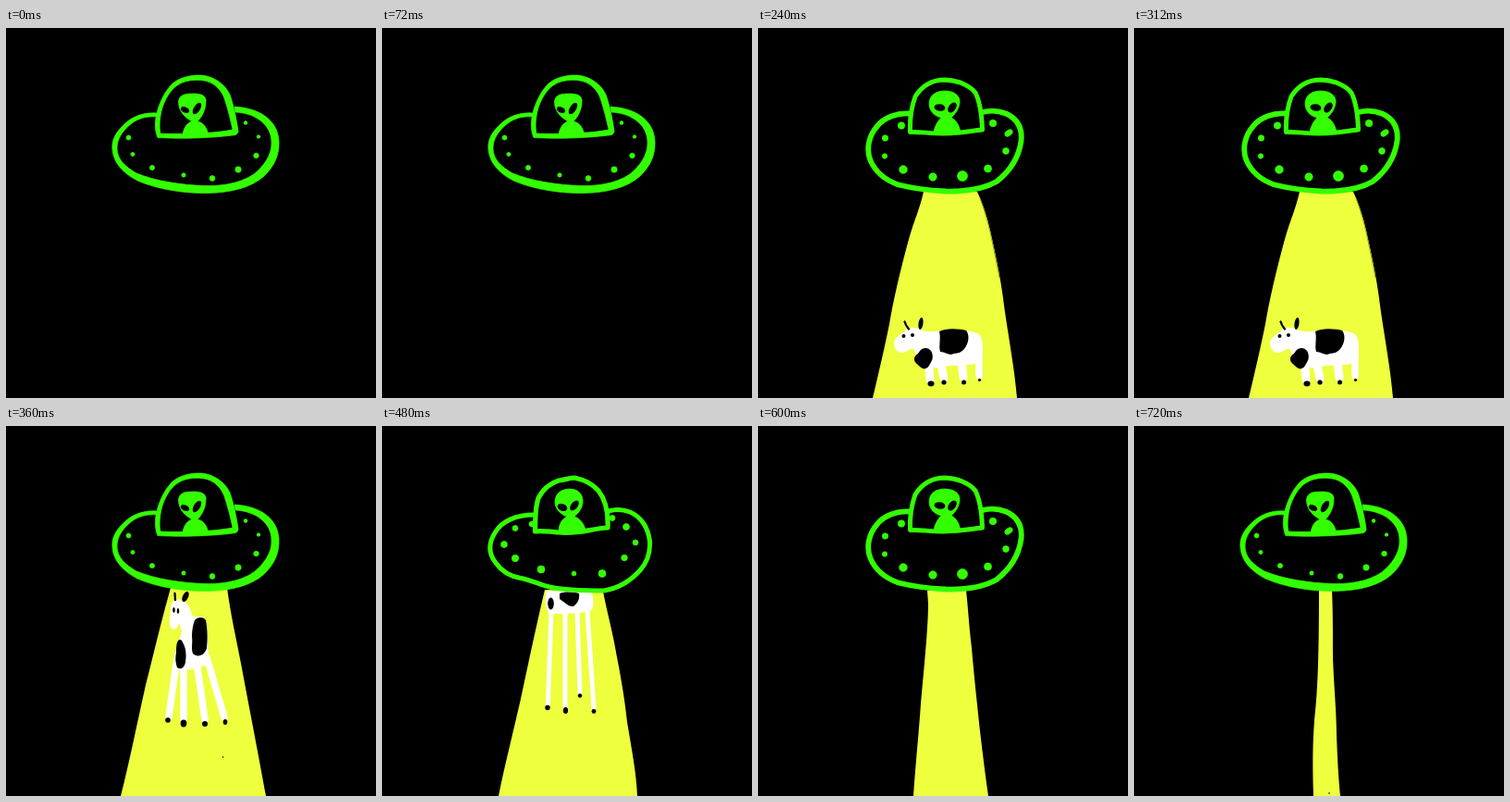
Animation, 400 px wide and 400 px high, one loop 840 ms. Source, as an HTML page:

```html
<!DOCTYPE html>
<html lang="en">
<head>
<meta charset="utf-8">
<title>Saucer and cow</title>
<style>
html, body { margin: 0; width: 100%; height: 100%; overflow: hidden; background: #000; }
/* Seven 400px drawings side by side, one shown at a time */
#strip { display: block; width: 2800px; height: 400px; animation: play 840ms steps(7) infinite; }
@keyframes play { to { transform: translateX(-2800px); } }
.line { fill: none; stroke: #3f0; stroke-linecap: round; stroke-linejoin: round; }
.green { fill: #3f0; stroke: #3f0; stroke-width: .7; }
.beam { fill: #edff3d; }
.edge { fill: none; stroke: #8f9a24; stroke-width: 1; }
.cow { fill: #fff; }
.legs { fill: none; stroke: #fff; stroke-linecap: round; }
.horn { fill: none; stroke: #000; stroke-width: 2.300; stroke-linecap: round; }
</style>
</head>
<body>
<svg id="strip" viewBox="0 0 2800 400">
<defs>
  <g id="saucerA">
    <g class="green" fill-rule="evenodd">
      <path d="M163 92C150 91 137 95 128 104C118 113 114 122 115 131C116 146 127 157 142 165C165 175 195 179 218 178.500C245 178 265 172 278 161C289 151 296 138 295 122C294 103 279 87 247 85L248 91C270 92 287 105 287 123C288 137 278 150 268 158C252 169 230 171 215 170.500C190 170 160 165 141 157C129 150 120 142 120 130C120 119 127 111 133 105.500C141 98 152 95 163 96Z"/>
      <path d="M164 118.500C161 112 161 103 162 97C164 85 170 70 180 60C190 52 204 50 215 51.500C228 54 238 63 242 72C246 83 249 98 251 111C251 115 248 116 245 116C222 119 190 120 164 118.500ZM167 114C165 105 167 95 168 90C171 78 178 66 186 61.500C195 55.500 208 55.500 217 57.500C227 60.500 233 68 236 76C240 88 243 100 245 110C225 114 190 115 167 114Z"/>
      <path d="M186.500 79C188 71 196 71 203 71C211 71 217 73 216 80C216 88 212 96 207 101C214 102 218 109 219 117L191 118C191 109 195 103 201 101C194 97 186 90 186.500 79Z"/>
      <circle cx="132.500" cy="118.500" r="2.500"/><circle cx="137" cy="136.500" r="2.100"/>
      <circle cx="158" cy="151" r="2.600"/><circle cx="192" cy="159" r="2.200"/>
      <circle cx="223" cy="162.500" r="2.900"/><circle cx="251" cy="153" r="3.200"/>
      <circle cx="270.500" cy="138" r="2.800"/><circle cx="273" cy="117.500" r="1.800"/>
      <circle cx="259" cy="102.500" r="1.900"/>
    </g>
    <ellipse cx="193.500" cy="88.500" rx="5" ry="3" transform="rotate(25 193.500 88.500)"/>
    <ellipse cx="206.500" cy="87" rx="3.500" ry="7" transform="rotate(32 206.500 87)"/>
  </g>

  <g id="saucerB">
    <path class="line" stroke-width="5" d="M164 96C145 96 130 103 123 114C115 126 115 138 123 148C130 158 141 163 150 164.500C162 167 172 172 181 174C200 178 225 178 240 178C258 175 270 166 279 156C288 146 290 135 289.500 125C288 110 280 98 268 93C260 90 252 90 245 92"/>
    <path class="line" stroke-width="5.200" d="M165.500 114C166 100 165 90 169 78C174 68 182 62 191 59C198 58 204 56 208 56C218 58 228 63 234 70C241 79 245 90 244 110C225 111 215 117 190 115C180 114 172 113 165.500 114Z"/>
    <g class="green">
      <path d="M187 82C187 72 195 68 203 68C212 68 218 74 217 83C216 91 211 95 208 98C215 100 219 107 221 115L191 114C191 106 195 100 200 98C192 95 187 89 187 82Z"/>
      <circle cx="144" cy="110.500" r="3"/><circle cx="162" cy="106" r="3"/>
      <circle cx="132" cy="128" r="3.500"/><circle cx="144" cy="143" r="3.700"/>
      <circle cx="172" cy="155" r="4"/><circle cx="207.500" cy="159.500" r="2.500"/>
      <circle cx="238" cy="159.500" r="4"/><circle cx="262" cy="142.500" r="3.300"/>
      <circle cx="274" cy="126" r="3"/><circle cx="264" cy="109" r="3.500"/>
      <circle cx="249" cy="99.500" r="3"/>
    </g>
    <ellipse cx="195" cy="88" rx="5.500" ry="3.800" transform="rotate(22 195 88)"/>
    <ellipse cx="208" cy="86" rx="3.600" ry="6.300" transform="rotate(38 208 86)"/>
  </g>

  <g id="saucerC">
    <path class="line" stroke-width="5.800" d="M164 92.500C150 91.500 136 97 129 106C119 117 117 132 121.500 143C127 156 139 165 152 169.500C168 173.500 185 175.500 203 176.500C225 177 245 173.500 258 166C272 155 282 140 284.500 122C286 108 280 98 268 92.500C258 88.500 250 89 243 91"/>
    <path class="line" stroke-width="5" d="M164.500 112.500C164 100 166 85 170 74C177 63 188 56 202 56C216 56.500 229 62 235 70C240 80 242 95 242.500 110C230 111 222 114 200 114C185 114 176 112 164.500 112.500Z"/>
    <g class="green">
      <path d="M185 82C185 72 193 68 202 68C212 68 219 73 218 81C217 89 212 94 209 97C215 100 218 106 219 114L190 113C191 106 194 101 198 97C190 95 185 89 185 82Z"/>
      <circle cx="155" cy="105.500" r="3.700"/><circle cx="137.500" cy="119" r="3.200"/>
      <circle cx="137" cy="138.500" r="2.700"/><circle cx="157" cy="153" r="4.300"/>
      <circle cx="189" cy="161" r="4.200"/><circle cx="221" cy="160" r="5.500"/>
      <circle cx="248.500" cy="152" r="4"/><circle cx="268" cy="133" r="3.400"/>
      <ellipse cx="271" cy="113.500" rx="4.600" ry="3" transform="rotate(-35 271 113.500)"/>
      <circle cx="254" cy="103" r="3.800"/>
    </g>
    <ellipse cx="196.500" cy="86" rx="6" ry="3.800" transform="rotate(8 196.500 86)"/>
    <ellipse cx="210" cy="86" rx="3.800" ry="6.300" transform="rotate(36 210 86)"/>
  </g>
</defs>

<use href="#saucerA"/>

<g transform="translate(400)">
  <path class="beam" d="M178 177L241 178C249 205 257 235 262 270C265 290 270 320 273 340C276 360 280 380 282 400H126C132 385 138 365 142 345C150 300 160 260 167 230C172 210 176 195 178 177Z"/>
  <circle cx="175" cy="216" r=".8"/>
  <use href="#saucerB"/>
</g>

<g transform="translate(800)">
  <path class="beam" d="M179 177H237C244 192 249 208 253 228C258 250 263 275 266 300C270 330 277 365 280 400H124C130 375 137 345 142 320C148 285 157 250 164 225C169 208 175 195 179 177Z"/>
  <path class="edge" d="M240 184C246 200 250 215 253 230S259 258 261 270"/>
  <path class="legs" stroke-width="9" d="M184 360L186 380M197 360L201 379M220 360L222 378"/>
  <path class="legs" stroke-width="7.500" d="M239 340V376"/>
  <path class="cow" d="M147 340C148 334 155 331 160 326C165 322 172 324 178 327C190 330 200 326 215 327C228 328 239 328 241 334C244 345 243 356 241 361C230 365 220 365 208 365C196 368 182 369 175 363C170 358 171 350 168 347C163 346 162 351 156 351C150 351 147 346 147 340Z"/>
  <path d="M196 328C204 324 216 325 225 327C229 332 228 341 223 347C218 353 213 351 209 353C204 353 202 350 197 350C195 344 198 336 196 328Z"/>
  <path d="M175 349C178 345 184 345 187 349C190 354 189 359 186 363C184 368 180 370 176 367C173 364 168 361 169 357C170 353 173 353 175 349Z"/>
  <circle cx="157.500" cy="333" r="2"/><circle cx="167" cy="332" r="2"/>
  <path class="horn" d="M158.500 317.500Q160 322 163 325.500"/>
  <ellipse cx="176" cy="319.500" rx="2.500" ry="6.500" transform="rotate(8 176 319.500)"/>
  <ellipse cx="187" cy="384.500" rx="3.500" ry="3"/><circle cx="201" cy="383" r="2.600"/>
  <circle cx="222.500" cy="383" r="2.500"/><circle cx="239.500" cy="380.500" r="1.600"/>
  <use href="#saucerC"/>
</g>

<g transform="translate(1200)">
  <path class="beam" d="M178 175H239C243 205 250 235 255 262C262 300 272 350 281 400H124C133 365 142 320 151 280C160 245 168 210 178 175Z"/>
  <path class="legs" stroke-width="7.500" d="M184 257L176 314M192 258V317M206 255L215 317M217 250L236 315"/>
  <path class="cow" d="M178 195C180 187 187 186 192 189C198 193 200 200 202 206L213 206C218 215 218 235 219 248C221 256 214 261 205 262C196 264 182 267 181 258C181 245 187 235 190 222C188 217 188 211 186 216C184 221 178 221 177 215C176 208 178 202 178 195Z"/>
  <path d="M204 210C207 206 214 206 216 210C218 220 218 232 217 240C215 248 207 251 202 246C200 240 202 234 201 228C201 221 202 215 204 210Z"/>
  <path d="M186 232C188 230 190 231 191 234C195 240 195 249 194 255C193 262 188 264 185 261C183 256 183 250 184 245C184 240 184 235 186 232Z"/>
  <ellipse cx="181.500" cy="199" rx="1.300" ry="3"/><ellipse cx="186" cy="200" rx="1.300" ry="3"/>
  <path class="horn" d="M182.500 181L183 188"/>
  <ellipse cx="194" cy="184.500" rx="3" ry="6" transform="rotate(25 194 184.500)"/>
  <circle cx="175" cy="318" r="2.800"/><ellipse cx="192" cy="321.500" rx="3.300" ry="4"/>
  <circle cx="215" cy="322" r="3"/><ellipse cx="237" cy="320" rx="2.300" ry="3"/>
  <circle cx="234.500" cy="358" r=".8"/>
  <use href="#saucerA"/>
</g>

<g transform="translate(1600)">
  <path class="beam" d="M176 177L239 179C243 200 250 225 254 250C259 275 263 300 265 320C270 350 275 375 276 400H126C132 370 142 330 150 295C157 262 167 215 176 177Z"/>
  <path class="legs" stroke-width="5" d="M183 200L179.500 301M198 200V304M211 200L214 289M222 200L229 305"/>
  <path class="cow" d="M178 178L226 180C229 185 229 194 227 199C218 203 200 203 181 203C176 197 176 185 178 178Z"/>
  <ellipse cx="182.500" cy="192" rx="3.300" ry="6.500"/>
  <path d="M192 181C200 178 210 180 213 181C214 188 211 192 207 195C202 196 197 190 192 187Z"/>
  <circle cx="179" cy="304.500" r="2.700"/><ellipse cx="198.500" cy="307.500" rx="2.600" ry="3.500"/>
  <circle cx="214" cy="291.500" r="2.200"/><circle cx="229" cy="308.500" r="2.400"/>
  <use href="#saucerB"/>
</g>

<g transform="translate(2000)">
  <path class="beam" d="M183 178H225C227 195 228 215 231 240C234 275 238 310 240 330C243 355 246 380 249 400H168C170 370 174 330 176 300C179 265 184 220 184 192Z"/>
  <use href="#saucerC"/>
</g>

<g transform="translate(2400)">
  <path class="beam" d="M200 177H214C215 200 215 220 215 250C216 280 219 310 219 335C220 360 221 380 223 400H194C193 370 193 345 195 318C198 290 200 260 200 177Z"/>
  <circle cx="211" cy="397" r=".8"/>
  <use href="#saucerA"/>
</g>
</svg>
</body>
</html>
```
